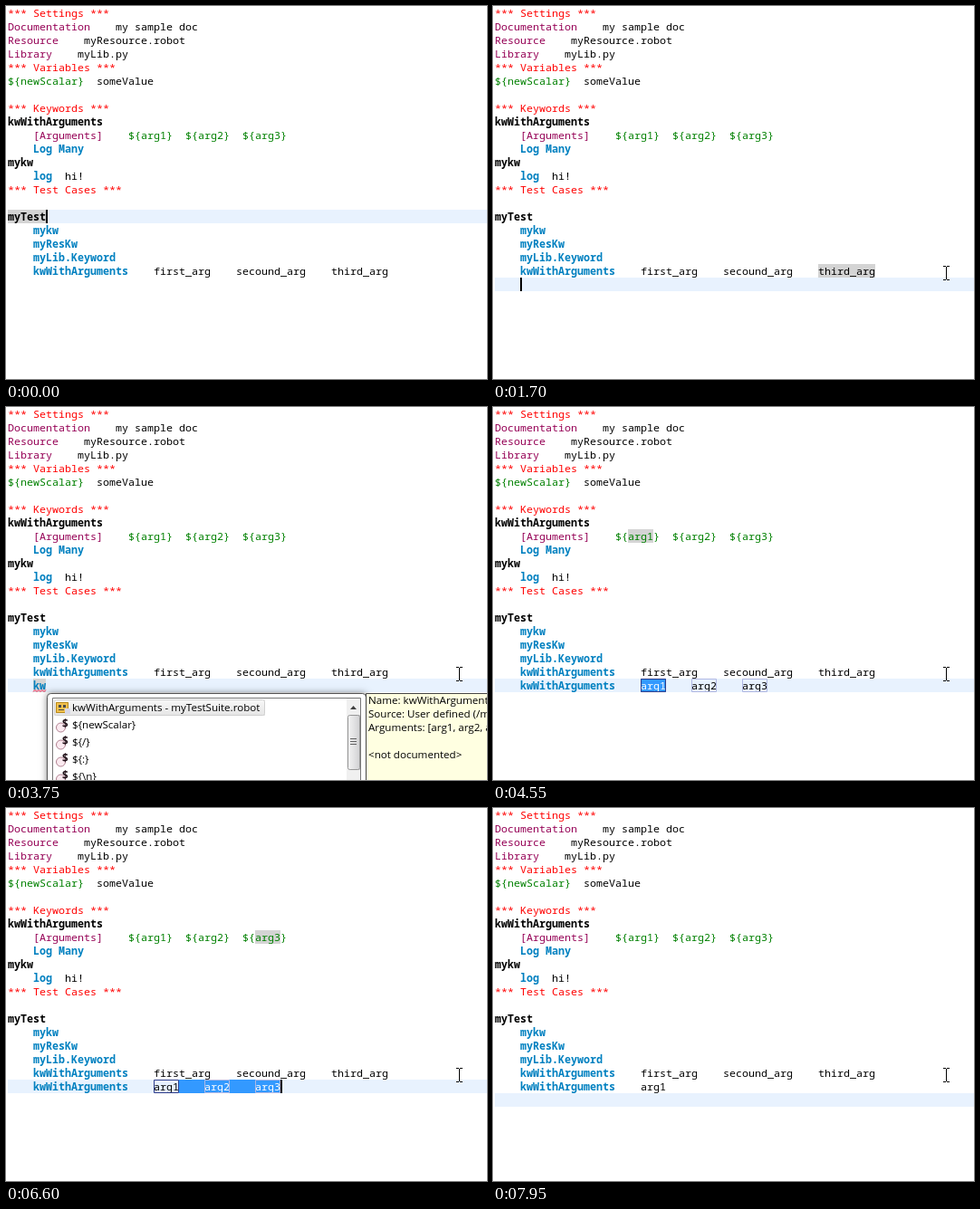
Animation of 531 by 412 pixels, one loop 8000 ms. Source, as an HTML page with a canvas:

```html
<!DOCTYPE html>
<html>
<head>
<meta charset="utf-8">
<style>
html, body { margin: 0; width: 100%; height: 100%; overflow: hidden; background: #fff; }
canvas { display: block; }
</style>
</head>
<body>
<canvas id="stage" width="531" height="412"></canvas>
<script>
const ctx = document.getElementById('stage').getContext('2d');
const LOOP = 8000, BLINK = 500, MARK_DELAY = 50;
const CHAR = 7, ROW = 15, EDIT_ROW = 20, INDENT = 4;
const MONO = '11.667px "Noto Sans Mono", "DejaVu Sans Mono", monospace';
const SANS = '11.6px "Open Sans", "Noto Sans", sans-serif';
const BLACK = '#000';

const source = `*** Settings ***
Documentation    my sample doc
Resource    myResource.robot
Library    myLib.py
*** Variables ***
\${newScalar}  someValue

*** Keywords ***
kwWithArguments
    [Arguments]    \${arg1}  \${arg2}  \${arg3}
    Log Many
mykw
    log  hi!
*** Test Cases ***

myTest
    mykw
    myResKw
    myLib.Keyword
    kwWithArguments    first_arg    secound_arg    third_arg`.split('\n');

// What the user does; text and row carry over to the next step.
const steps = [
  { t: 150, row: 15, col: 6, text: '' },
  { t: 1400, row: 19, col: 60 },
  { t: 1700, row: EDIT_ROW, col: INDENT },
  { t: 2500, col: 5, text: 'k' },
  { t: 2950, col: 6, text: 'kw' },
  { t: 3950, col: 27, anchor: 23, text: 'kwWithArguments    arg1    arg2    arg3' },
  { t: 5750, col: 27 },
  { t: 6050, col: 31, anchor: 27 },
  { t: 6500, col: 39, anchor: 27 },
  { t: 6600, col: 43, anchor: 27 },
  { t: 7250, col: 27, text: 'kwWithArguments    arg1' },
  { t: 7450, row: 21, col: INDENT }
];
const states = [];
for (const step of steps) {
  states.push({ ...states[states.length - 1], anchor: step.col, ...step });
}

const stateAt = t => states.filter(s => s.t <= t).pop() || states[0];
const linesOf = state => [...source, ' '.repeat(INDENT) + state.text];
const colX = col => 2 + col * CHAR;
const within = (t, from, to) => t >= from && t < to;

function rect(x, y, w, h, fill) {
  ctx.fillStyle = fill;
  ctx.fillRect(x, y, w, h);
}

function frame(x, y, w, h, color, radius = 0) {
  ctx.strokeStyle = color;
  ctx.lineWidth = 1;
  ctx.beginPath();
  ctx.roundRect(x + .5, y + .5, w - 1, h - 1, radius);
  ctx.stroke();
}

function gradient(x0, y0, x1, y1, from, to) {
  const fill = ctx.createLinearGradient(x0, y0, x1, y1);
  fill.addColorStop(0, from);
  fill.addColorStop(1, to);
  return fill;
}

function label(text, x, y, color = BLACK, font = SANS) {
  ctx.font = font;
  ctx.fillStyle = color;
  ctx.fillText(text, x, y);
}

// Syntax colour and weight of one table cell
function cellStyle(cell, row, col) {
  if (cell.startsWith('***')) return ['#ff0000'];
  if (cell.startsWith('$')) return ['#008000'];
  if (cell.startsWith('[') || (col === 0 && row < 4)) return ['#950055'];
  if (col === 0) return [BLACK, '600 '];
  return col === INDENT ? ['#0080c0', '600 '] : [BLACK];
}

function drawLine(line, row, tint) {
  for (const { 0: cell, index } of line.matchAll(/\S+( \S+)*/g)) {
    const [color, weight = ''] = cellStyle(cell, row, index);
    label(cell, colX(index), row * ROW + 12, tint || color, weight + MONO);
  }
}

// Shades every occurrence of the word at the caret
function drawMarks(state, lines) {
  const words = [...(linesOf(state)[state.row] || '').matchAll(/\w+/g)];
  const hit = words.find(w => w.index <= state.col && state.col <= w.index + w[0].length);
  if (!hit) return;
  lines.forEach((line, row) => {
    for (const word of line.matchAll(/\w+/g)) {
      if (word[0] === hit[0]) rect(colX(word.index), row * ROW, word[0].length * CHAR, ROW, '#d4d4d4');
    }
  });
}

function drawSelection({ anchor, col }, line) {
  const y = EDIT_ROW * ROW;
  ctx.save();
  ctx.beginPath();
  ctx.rect(colX(anchor), y, (col - anchor) * CHAR, ROW);
  ctx.clip();
  rect(0, y, 531, ROW, '#3399ff');
  drawLine(line, EDIT_ROW, '#fff');
  ctx.restore();
}

function drawSlots(line) {
  [...line.matchAll(/arg\d/g)].forEach((slot, i) =>
    frame(colX(slot.index), EDIT_ROW * ROW, 28, ROW, i ? '#b0b8e4' : '#2c3c8c'));
}

function drawSquiggle() {
  ctx.strokeStyle = '#ff2a60';
  ctx.lineWidth = 1;
  ctx.beginPath();
  for (let x = 30; x <= 44; x += 2) ctx.lineTo(x, x % 4 ? 314.5 : 312.5);
  ctx.stroke();
}

function drawKeywordIcon(y) {
  rect(55, y - 6, 14, 12, '#f2c14e');
  frame(55, y - 6, 14, 12, '#b98a1c');
  for (const x of [58, 63]) rect(x, y - 3, 3, 3, '#4a4a4a');
  rect(58, y + 2, 6, 1, '#4a4a4a');
  rect(65, y + 1, 6, 6, '#d8d8e8');
}

function drawVariableIcon(y) {
  ctx.beginPath();
  ctx.arc(60.5, y + 3, 5, 0, 7);
  ctx.fillStyle = '#fbeaf0';
  ctx.fill();
  ctx.strokeStyle = '#b08090';
  ctx.lineWidth = 1;
  ctx.stroke();
  label('$', 62, y + 3, '#201018', 'bold ' + SANS);
}

function drawScrollbar() {
  rect(376, 322, 15, 90, '#f0f0f0');
  ctx.fillStyle = '#404040';
  ctx.beginPath();
  ctx.moveTo(380, 334);
  ctx.lineTo(387, 334);
  ctx.lineTo(383.5, 330);
  ctx.fill();
  rect(377, 340, 14, 61, gradient(377, 0, 391, 0, '#f5f5f5', '#d0d0d2'));
  frame(377, 340, 14, 61, '#979797', 2);
  for (let y = 366; y < 375; y += 3) rect(380, y, 7, 1, '#606060');
}

function drawPopup() {
  ctx.save();
  ctx.shadowColor = 'rgba(0,0,0,.6)';
  ctx.shadowBlur = 8;
  rect(46, 317, 351, 110, '#fff');
  ctx.restore();
  frame(45, 316, 353, 110, '#555', 4);
  frame(51, 321, 341, 110, '#777');

  rect(53, 323, 233, 18, gradient(0, 323, 0, 341, '#f8f8f8', '#e5e5e5'));
  frame(53, 323, 233, 18, '#d0d0d0', 2);
  ['kwWithArguments - myTestSuite.robot', '${newScalar}', '${/}', '${:}', '${\\n}'].forEach((name, i) => {
    const y = 332 + i * 19;
    (i ? drawVariableIcon : drawKeywordIcon)(y);
    label(name, 73, y + 4);
  });
  drawScrollbar();
}

function drawDoc() {
  rect(397, 316, 140, 100, '#ffffe1');
  frame(397, 316, 140, 100, '#444');
  ['Name: kwWithArguments', 'Source: User defined (/myTestSuite', 'Arguments: [arg1, arg2, arg3]', '', '<not documented>']
    .forEach((text, i) => label(text, 400, 328 + i * ROW));
}

// The mouse sweeps along an arc, repainted every 100 ms.
function drawPointer(t) {
  const p = Math.min(1, Math.max(0, Math.floor((t - 700) / 100) / 5));
  const x = Math.round(349 + 151 * Math.sin(p * Math.PI / 2));
  const y = Math.round(247 + 48 * p + 24 * Math.sin(p * Math.PI));
  rect(x, y - 7, 1, 14, BLACK);
  for (const edge of [y - 8, y + 7]) {
    rect(x - 3, edge, 3, 1, BLACK);
    rect(x + 1, edge, 3, 1, BLACK);
  }
}

function draw(t) {
  const state = stateAt(t);
  const lines = linesOf(state);
  rect(0, 0, 531, 412, '#fff');
  rect(2, state.row * ROW, 529, ROW, '#e8f2fe');
  drawMarks(stateAt(t - MARK_DELAY), lines);
  lines.forEach((line, row) => drawLine(line, row));

  if (state.anchor < state.col) drawSelection(state, lines[EDIT_ROW]);
  if (within(t, 4450, 7250)) drawSlots(lines[EDIT_ROW]);
  if (within(t, 3750, 3950)) drawSquiggle();

  const caretOn = Math.trunc((t - state.t) / BLINK) % 2 === 0;
  if (caretOn) rect(colX(state.col), state.row * ROW, 2, ROW, BLACK);

  if (within(t, 3300, 3950)) drawPopup();
  if (within(t, 3650, 3950)) drawDoc();
  if (t >= 650) drawPointer(t);
}

function tick() {
  draw(performance.now() % LOOP);
  requestAnimationFrame(tick);
}
tick();
</script>
</body>
</html>
```
